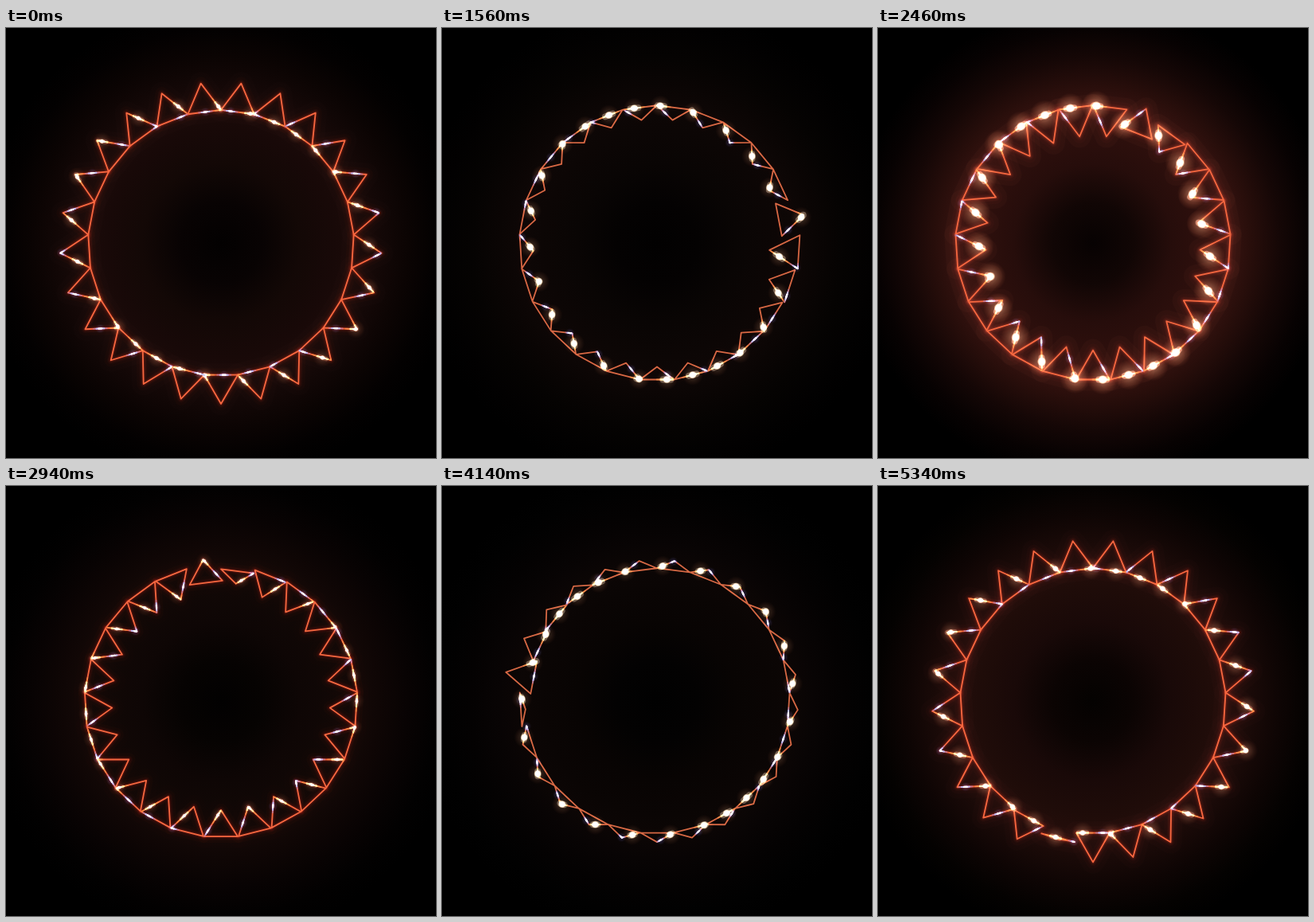
Recreate the animation shown at these times as an HTML page with a canvas. Size 540 by 540 pixels, loop 5400 ms.

```html
<!DOCTYPE html>
<html lang="en">
<head>
<meta charset="utf-8">
<title>Tumbling ring</title>
<style>
html, body { margin: 0; width: 100%; height: 100%; overflow: hidden; background: #000; }
canvas { display: block; width: 540px; height: 540px; }
</style>
</head>
<body>
<canvas id="stage" width="540" height="540"></canvas>
<script>
const ctx = document.getElementById('stage').getContext('2d');
const TAU = Math.PI * 2;
const LOOP = 5400, STEP = 60;
const COUNT = 25, MID = 270;
const HALF = 21, HEIGHT = 36.3, DEPTH = 800;
const STAGGER = 212, DECAY = 157;   // tumble wave
const LAP = 900;                    // one trip of the light round a triangle

const rgba = (r, g, b, a) => `rgba(${r},${g},${b},${a})`;

// Corners in the order the light visits them.
function corners(i, t) {
  const swing = TAU * t / LOOP;
  const since = t - i * STAGGER;
  const tilt = swing + (since < 0 ? 0 : TAU * Math.exp(-((since / DECAY) ** 0.88)));
  const centre = 168.3 + 9.5 * Math.cos(swing);
  const phi = TAU * i / COUNT, s = Math.sin(phi), c = Math.cos(phi);
  const place = (q, h) => {
    const k = DEPTH / (DEPTH + h * Math.sin(tilt));
    const r = (centre + h * Math.cos(tilt)) * k;
    return [MID + r * s + q * k * c, MID + r * c - q * k * s];
  };
  return [place(HALF, -HEIGHT / 3), place(-HALF, -HEIGHT / 3), place(0, HEIGHT * 2 / 3)];
}

function along(tri, u) {
  u = ((u % 3) + 3) % 3;
  const n = Math.floor(u), f = u - n;
  const a = tri[n], b = tri[(n + 1) % 3];
  return [a[0] + (b[0] - a[0]) * f, a[1] + (b[1] - a[1]) * f];
}

function outline(tri) {
  ctx.beginPath();
  tri.forEach(p => ctx.lineTo(p[0], p[1]));
  ctx.closePath();
}

// Stroke part of the outline around u, following the corners.
function dash(tri, u, reach, width, color) {
  ctx.beginPath();
  for (let k = -6; k <= 6; k++) {
    const p = along(tri, u + reach * k / 6);
    ctx.lineTo(p[0], p[1]);
  }
  ctx.lineWidth = width;
  ctx.strokeStyle = color;
  ctx.stroke();
}

function spot(p, radius, stops) {
  const g = ctx.createRadialGradient(p[0], p[1], 0, p[0], p[1], radius);
  stops.forEach(([at, color]) => g.addColorStop(at, color));
  ctx.fillStyle = g;
  ctx.fillRect(p[0] - radius, p[1] - radius, radius * 2, radius * 2);
}

function haze(level) {
  const tone = a => rgba((11 + 50 * level) * a, (6 + 15 * level) * a, (5 + 12 * level) * a, 1);
  const profile = [[0, 0.12], [0.17, 0.3], [0.33, 0.68], [0.48, 0.85], [0.57, 1],
    [0.66, 0.72], [0.78, 0.38], [0.9, 0.12], [1, 0]];
  spot([MID, MID], 300, profile.map(([at, a]) => [at, tone(a)]));
}

function draw(t) {
  const flat = Math.cos(TAU * t / LOOP) ** 2;
  const flare = 0.5 + 0.5 * Math.cos(TAU * (t - 600) / LAP);
  const tris = Array.from({ length: COUNT }, (_, i) => corners(i, t));

  ctx.globalCompositeOperation = 'source-over';
  ctx.fillStyle = '#000';
  ctx.fillRect(0, 0, 540, 540);
  haze(flat * (0.12 + 0.88 * flare));

  ctx.globalCompositeOperation = 'lighter';
  ctx.lineJoin = ctx.lineCap = 'round';
  const bloom = flat * flare;
  for (const tri of tris) {
    outline(tri);
    for (const [w, a] of [[16, 0.02], [9, 0.045], [5, 0.11]]) {
      ctx.lineWidth = w;
      ctx.strokeStyle = rgba(255, 30 + 50 * bloom, 12 + 38 * bloom, a * flat);
      ctx.stroke();
    }
    ctx.lineWidth = 28;
    ctx.strokeStyle = rgba(255, 110, 75, 0.025 * bloom);
    ctx.stroke();
  }

  ctx.globalCompositeOperation = 'source-over';
  ctx.lineWidth = 1.8;
  ctx.strokeStyle = rgba(214 + 36 * flat, 104, 68 - 4 * flat, 1);
  for (const tri of tris) {
    outline(tri);
    ctx.stroke();
  }

  tris.forEach((tri, i) => {
    const u = 1.01 + t * 3 / LAP + i * 6 / COUNT;
    const tail = u - 0.6;
    dash(tri, tail, 0.2, 1.8, rgba(170, 140, 225, 0.5));
    dash(tri, tail, 0.12, 2, rgba(185, 195, 255, 0.85));
    dash(tri, tail, 0.045, 2.2, '#fff');

    dash(tri, u, 0.3, 1.8, rgba(255, 170, 75, 0.5));
    dash(tri, u, 0.17, 2, rgba(255, 222, 150, 0.85));
    dash(tri, u, 0.07, 2 + 1.5 * flare, '#fffbe8');

    ctx.globalCompositeOperation = 'lighter';
    const p = along(tri, u);
    dash(tri, u, 0.12, 5 + 3 * flare, rgba(255, 235, 205, 0.12 + 0.18 * flare));
    spot(p, 9 + 4 * flare + 7 * bloom, [
      [0, rgba(255, 225, 185, 0.22 + 0.3 * flare)],
      [0.35, rgba(255, 195, 145, 0.06 + 0.08 * flare + 0.14 * bloom)],
      [1, rgba(255, 130, 80, 0)]
    ]);
    spot(p, 2 + 3.2 * flare + 0.8 * bloom, [
      [0, rgba(255, 255, 245, 0.9)], [0.55, rgba(255, 250, 235, 0.75)], [1, rgba(255, 235, 200, 0)]
    ]);
    spot(along(tri, tail), 6, [[0, rgba(150, 150, 255, 0.25)], [1, rgba(120, 120, 255, 0)]]);
    ctx.globalCompositeOperation = 'source-over';
  });
}

const start = performance.now();
function tick() {
  const t = (performance.now() - start) % LOOP;
  draw(Math.floor(t / STEP) * STEP);
  requestAnimationFrame(tick);
}
tick();
</script>
</body>
</html>
```
